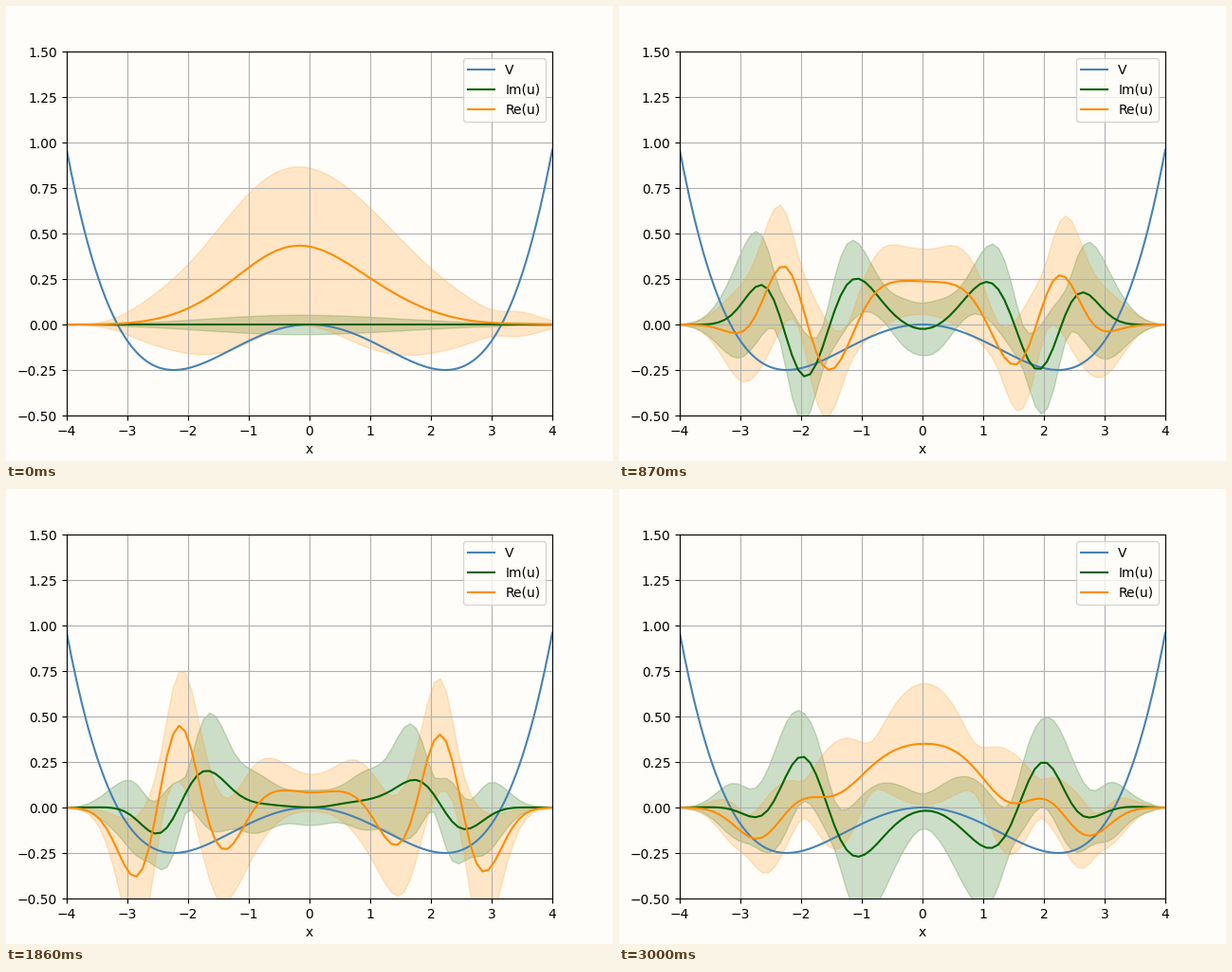
These frames come from a looping animation (640 by 480 pixels, 3.03 s). A matplotlib script:

```python
import numpy as np
import matplotlib.pyplot as plt
from matplotlib.animation import FuncAnimation

FRAMES, INTERVAL, DT = 101, 30, 0.1
L, N, H = 4.0, 80, 0.1          # half width, cells, semiclassical parameter
WIDTH, SPREAD, KICK = 0.4, 1.03, 0.32


def potential(x):
    return 0.01 * x**4 - 0.1 * x**2


# Schroedinger operator in a sine basis sampled at the cell centres
dx = 2 * L / N
x = -L + dx * (np.arange(N) + 0.5)
k = np.pi * np.arange(1, N + 1) / (2 * L)
basis = np.sin(np.outer(x + L, k))
basis /= np.linalg.norm(basis, axis=0)
ham = (basis * (H * k**2)) @ basis.T + np.diag(potential(x) / H)
energy, modes = np.linalg.eigh(ham)

# Ensemble of wave packets: random centre, slight random momentum
centre = np.linspace(-2.8, 2.8, 113)
weight = np.exp(-centre**2 / (2 * SPREAD**2))
weight *= 1 - 0.2 * centre * np.exp(-centre**2 / 2)
weight /= weight.sum()
centre = np.append(centre, 3.4)
weight = np.append(weight, 0.0032)
centre = np.tile(centre, 2)
weight = np.tile(weight / weight.sum(), 2) / 2
kick = np.repeat([-KICK, KICK], len(centre) // 2)

offset = x[:, None] - centre
packets = np.exp(-offset**2 / (2 * WIDTH**2) + 1j * kick * offset)
packets /= (np.pi * WIDTH**2) ** 0.25
coeffs = modes.T @ packets

xs = np.concatenate([[-L], x, [L]])


def stats(values):
    mean = values @ weight
    std = np.sqrt(np.maximum(values**2 @ weight - mean**2, 0))
    return np.pad(mean, 1, mode="edge"), np.pad(std, 1, mode="edge")


def evolve(t):
    u = modes @ (np.exp(-1j * energy * t)[:, None] * coeffs)
    return stats(u.imag), stats(u.real)


PAPER = "#fffdf9"
plt.rcParams["axes.facecolor"] = PAPER
fig = plt.figure(figsize=(6.4, 4.8), dpi=100, facecolor=PAPER)
ax = fig.add_axes([0.1, 0.1, 0.8, 0.8])
ax.set(xlim=(-L, L), ylim=(-0.5, 1.5), xlabel="x")
ax.grid(True)

fine = np.linspace(-L, L, 201)
ax.plot(fine, potential(fine), color="steelblue", label="V")

parts = []
for name, color in (("Im(u)", "darkgreen"), ("Re(u)", "darkorange")):
    line, = ax.plot(xs, 0 * xs, color=color, label=name)
    band = ax.fill_between(xs, 0 * xs, 0 * xs, color=color, alpha=0.2)
    parts.append((line, band))
ax.legend(loc="upper right")


def update(i):
    for (line, band), (mean, std) in zip(parts, evolve(i * DT)):
        line.set_ydata(mean)
        upper = np.column_stack([xs, mean + std])
        lower = np.column_stack([xs, mean - std])
        band.set_verts([np.vstack([upper, lower[::-1]])])
    return [artist for pair in parts for artist in pair]


anim = FuncAnimation(fig, update, frames=FRAMES, interval=INTERVAL,
                     repeat=True, repeat_delay=0, blit=False)
plt.show()
```
